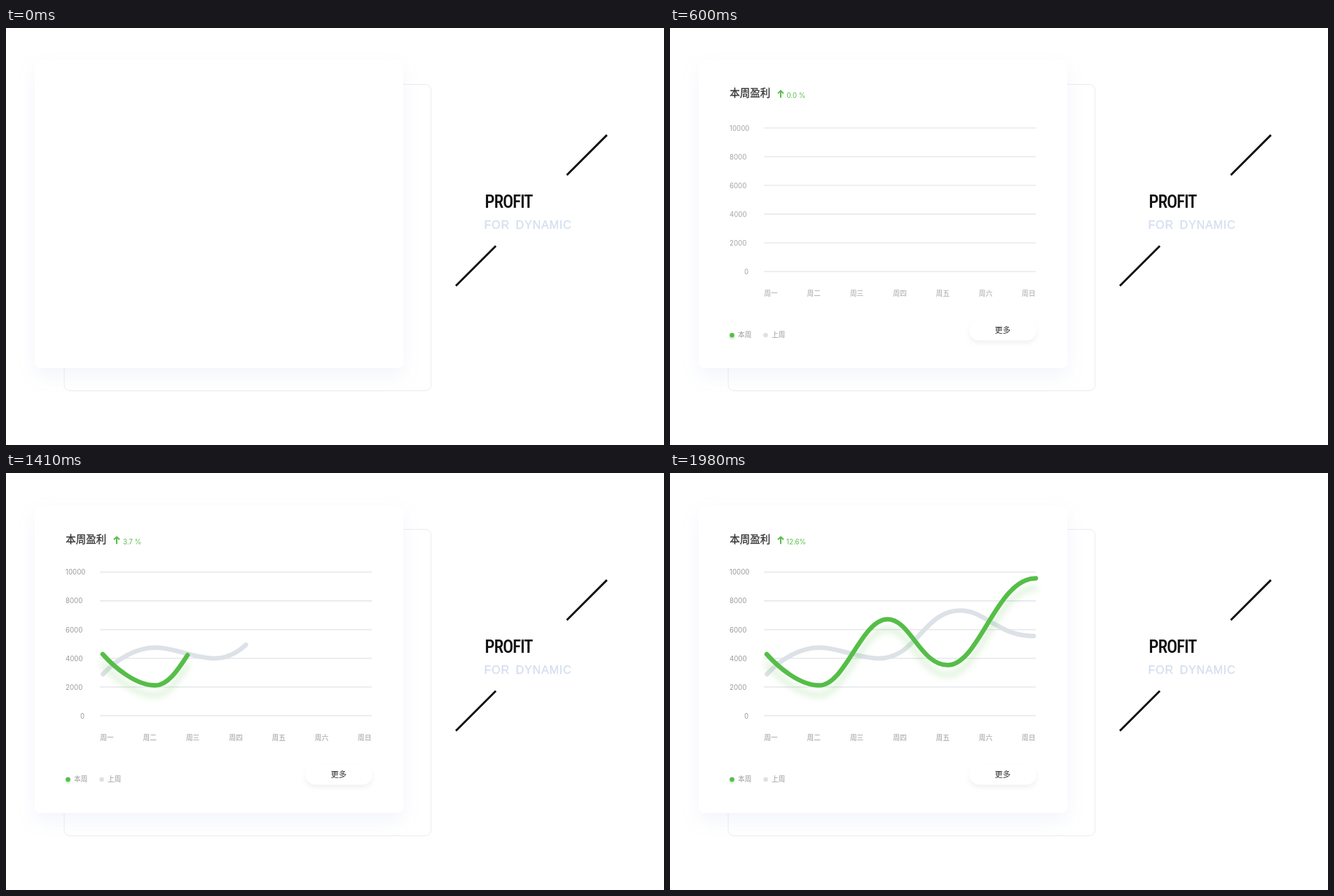
Recreate the animation shown at these times as an HTML page. Size 939 by 596 pixels, loop 2.7 s.

```html
<!DOCTYPE html>
<html lang="zh-CN">
<head>
<meta charset="utf-8">
<title>Profit card</title>
<style>
  html, body { margin: 0; width: 100%; height: 100%; overflow: hidden; background: #fff; }
  svg { display: block; width: 939px; height: 596px; font: 9.7px Inter, "Noto Sans CJK SC", "Noto Sans CJK", sans-serif; }
  .card { fill: #fff; filter: drop-shadow(0 11px 13px rgba(80, 110, 200, .07)); }
  .frame { fill: none; stroke: #e9ecf2; }
  .slash { stroke: #111; stroke-width: 3; }
  .word { font: 500 25px "Roboto Condensed", "Liberation Sans Narrow", Roboto, sans-serif; font-stretch: condensed; letter-spacing: -1px; fill: #111; }
  .sub { font: 16px "Liberation Sans", sans-serif; letter-spacing: .85px; fill: #d5dfef; stroke: #d5dfef; stroke-width: .4; }
  .title { font-size: 14.5px; font-weight: 500; fill: #333; stroke: #333; stroke-width: .3; }
  .green { fill: #55be47; }
  .mid { text-anchor: middle; }
  .arrow, .curve { fill: none; stroke: #55be47; stroke-width: 2; }
  .curve { stroke-width: 6.5; stroke-linecap: round; }
  .last { stroke: #dce2e7; }
  .this { filter: drop-shadow(0 14px 5px rgba(85, 190, 71, .23)); }
  .grid { stroke: #e1e3e6; stroke-width: 1.3; }
  .label { fill: #999; }
  .glow { filter: drop-shadow(0 2px 1.5px rgba(85, 190, 71, .4)); }
  .button { fill: #fff; filter: drop-shadow(0 4px 3px rgba(40, 60, 70, .07)); }
  .more { font-size: 11.3px; fill: #333; }
</style>
</head>
<body>
<svg viewBox="0 0 939 596">
  <rect class="frame" x="83" y="80.5" width="523.5" height="438" rx="8"/>
  <rect class="card" x="41" y="46" width="526" height="440" rx="8"/>
  <path class="slash" d="M800.3 210.2L857.6 152.9M642 368.5L699 311.5"/>
  <text class="word" x="683.3" y="256.8">PROFIT</text>
  <text class="sub" y="287"><tspan x="682.5">FOR</tspan><tspan x="727.6">DYNAMIC</tspan></text>

  <g id="head">
    <text class="title" x="85.3" y="100">本周盈利</text>
    <path class="arrow" d="M158 101.5V91.5M154 95.3L158 91.3L162 95.3"/>
    <text class="green mid" id="rate" x="180" y="101.5"></text>
  </g>

  <g id="chart"></g>

  <g id="foot">
    <circle class="green glow" cx="88.5" cy="438" r="3.3"/>
    <text class="label" x="97" y="441.4">本周</text>
    <circle cx="136.5" cy="438" r="3.3" fill="#dde1e3"/>
    <text class="label" x="145" y="441.4">上周</text>
    <rect class="button" x="427" y="417" width="96" height="28.5" rx="14.2"/>
    <text class="more mid" x="474.7" y="435">更多</text>
  </g>

  <path class="curve last" id="last" pathLength="1" d="M138.5 287.5C158 266 186 249.5 213 249.5S270 265 298 265C352 265 362 196.5 414 196.5C450 196.5 468 233 519 233"/>
  <path class="curve this" id="this" pathLength="1" d="M138 259C155 278 185 303.5 213 303.5C250 303.5 273 209 310.5 209C343 209 357 274.5 396.5 274.5C441 274.5 466 150.5 522 150.5"/>
</svg>
<script>
const LOOP = 2700;
const byId = id => document.getElementById(id);

let chart = '';
for (let i = 0; i < 6; i++) {
  const y = 141.7 + 41.05 * i, value = 10000 - 2000 * i;
  chart += `<path class="grid" d="M134 ${y}H522"/>
    <text class="label" x="${value ? 85 : 106}" y="${y + 3.7}">${value}</text>`;
}
[...'一二三四五六日'].forEach((day, i) => {
  chart += `<text class="label mid" x="${144 + 61.3 * i}" y="381.7">周${day}</text>`;
});
byId('chart').innerHTML = chart;

// Smooth progress from 0 to 1 between two times
function ease(t, start, end) {
  const u = Math.min(1, Math.max(0, (t - start) / (end - start)));
  return u * u * (3 - 2 * u);
}

function slideIn(id, offset, move, fade) {
  const el = byId(id);
  el.setAttribute('transform', `translate(0 ${offset * (1 - move)})`);
  el.setAttribute('opacity', fade);
}

function trim(id, part) {
  const el = byId(id);
  el.setAttribute('visibility', part > 0 ? 'visible' : 'hidden');
  el.setAttribute('stroke-dasharray', part < 1 ? `${part} 2` : 'none');
}

function draw(now) {
  const t = now % LOOP;
  const move = ease(t, 75, 725), quick = ease(t, 75, 400);
  slideIn('head', -18, move, quick);
  slideIn('chart', 12.3, move, move);
  slideIn('foot', 11, move, quick);

  const grown = ease(t, 1100, 1965), rate = 12.6 * grown;
  trim('last', ease(t, 970, 1825));
  trim('this', grown);
  byId('rate').textContent = rate.toFixed(1) + (rate < 9.95 ? ' %' : '%');
  requestAnimationFrame(() => draw(performance.now()));
}
draw(0);
</script>
</body>
</html>
```
